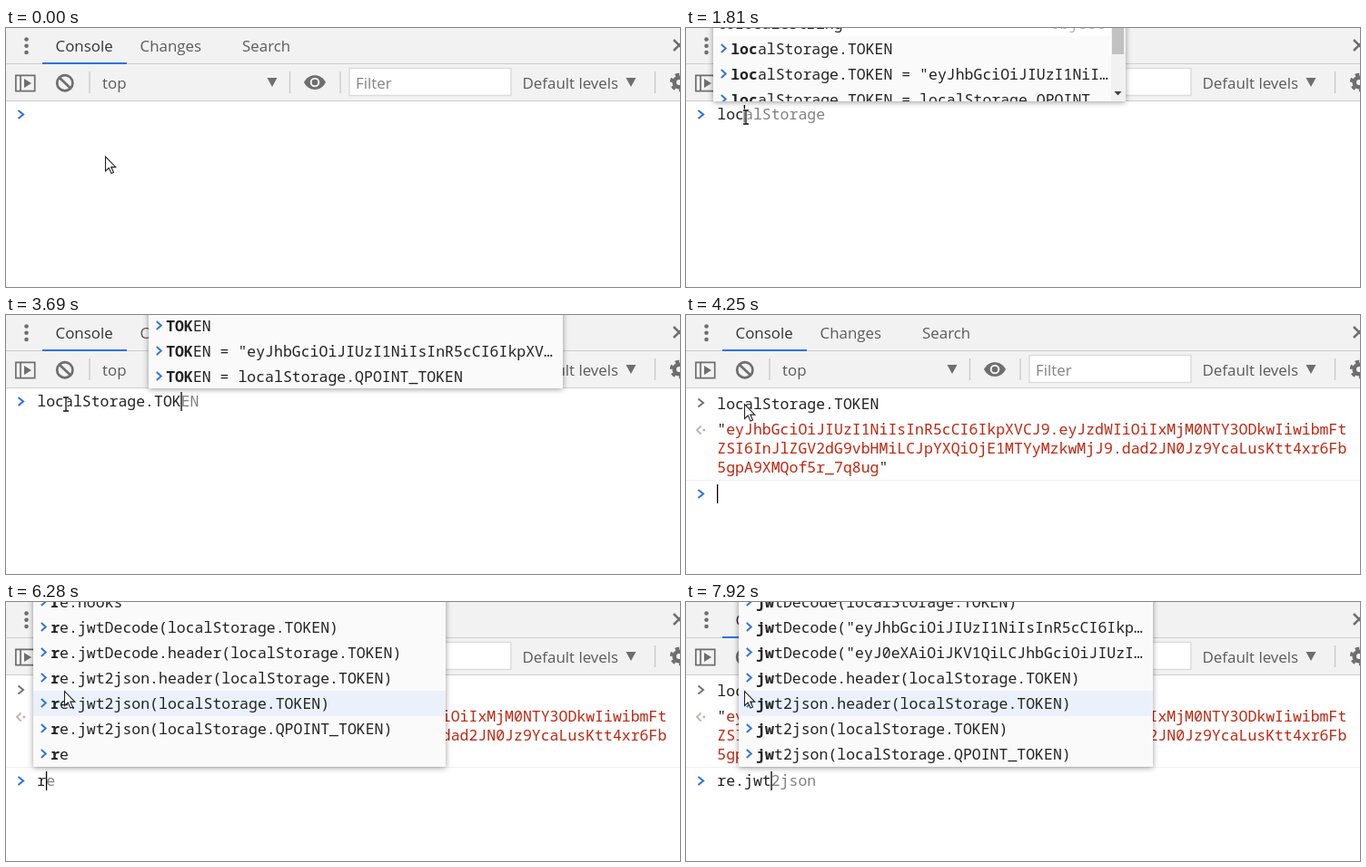
An HTML page for the animation above (7.99 s loop, 742 px wide and 286 px high).

```html
<!DOCTYPE html>
<html lang="en">
<head>
<meta charset="utf-8">
<title>Console session</title>
<style>
html, body { margin: 0; width: 100%; height: 100%; overflow: hidden; background: #fff; }
svg { display: block; }
text { white-space: pre; }
.ui { font: 16.9px "Open Sans", "Noto Sans", sans-serif; fill: #5a5a5a; }
.code { font: 16.5px "Noto Sans Mono", "DejaVu Sans Mono", monospace; fill: #222; }
.code .b { font-weight: 700; }
.code .hint { fill: #808080; }
.code.type { fill: #b4b4b4; }
.code.str { fill: #c0260f; }
.icon { fill: #6e6e6e; }
.line { fill: none; stroke: #6e6e6e; }
.shadow { filter: drop-shadow(0 1px 3px rgba(0, 0, 0, .4)); }
</style>
</head>
<body>
<svg width="742" height="286" viewBox="0 0 742 286">
  <rect width="742" height="80" fill="#f2f2f2"/>
  <path d="M0 39.5H742M0 80.5H742" stroke="#cdcdcd"/>
  <rect x="40" y="38" width="93" height="2" fill="#2a74e6"/>
  <g class="icon">
    <circle cx="22.5" cy="12.5" r="2.3"/><circle cx="22.5" cy="19.8" r="2.3"/><circle cx="22.5" cy="27" r="2.3"/>
    <path d="M20 56V66L28 61ZM287.500 55H298.500L293 65ZM682.500 55H693.500L688 65Z"/>
    <path d="M328 60C333 49.500 347 49.500 352 60C347 70.500 333 70.500 328 60Z"/>
    <circle cx="340" cy="60" r="5.300" fill="#f2f2f2"/><circle cx="340" cy="60" r="3.300"/>
  </g>
  <g class="line">
    <path d="M10.800 52.300H31.700V69.700H10.800ZM16 52V70" stroke-width="1.700"/>
    <circle cx="64.800" cy="60.700" r="8.600" stroke-width="2.700"/>
    <path d="M59 55L71 66.500" stroke-width="2.700"/>
    <path d="M735 13L747 25M735 25L747 13" stroke-width="2.500"/>
    <circle cx="741" cy="60" r="5.300" stroke-width="4.600"/>
    <circle cx="741" cy="60" r="8.700" stroke-width="3" stroke-dasharray="4.555"/>
  </g>
  <path d="M92 48V72M312.500 48V72M368 48V72M714.500 48V72" stroke="#c8c8c8" stroke-width="1.300"/>
  <rect x="378" y="44.500" width="178" height="30" fill="#fff" stroke="#dcdcdc" stroke-width="1.500"/>
  <g class="ui">
    <text x="54.500" y="26" style="fill:#333">Console</text>
    <text x="147.500" y="26">Changes</text>
    <text x="260" y="26">Search</text>
    <text x="106" y="67">top</text>
    <text x="385" y="67" style="fill:#828282">Filter</text>
    <text x="568.500" y="67">Default levels</text>
  </g>
  <g id="log">
    <path d="M0 182.500H742" stroke="#f0f0f0"/>
    <path d="M13.500 92.500L19 97L13.500 101.500" fill="none" stroke="#6e6e6e" stroke-width="1.900"/>
    <path d="M16.500 122.500L12 127L16.500 131.500" fill="none" stroke="#c7b0b0" stroke-width="1.900"/>
    <circle cx="19.800" cy="127" r="1.500" fill="#c7b0b0"/>
    <text class="code" x="34.300" y="104">localStorage.TOKEN</text>
    <text class="code str" x="34.300" y="132"><tspan fill="#222">"</tspan>eyJhbGciOiJIUzI1NiIsInR5cCI6IkpXVCJ9.eyJzdWIiOiIxMjM0NTY3ODkwIiwibmFt</text>
    <text class="code str" x="34.300" y="153">ZSI6InJlZGV2dG9vbHMiLCJpYXQiOjE1MTYyMzkwMjJ9.dad2JN0Jz9YcaLusKtt4xr6Fb</text>
    <text class="code str" x="34.300" y="174">5gpA9XMQof5r_7q8ug<tspan fill="#222">"</tspan></text>
  </g>
  <g id="prompt">
    <path id="mark" d="M13.500 91L19 95.500L13.500 100" fill="none" stroke-width="2.100"/>
    <text class="code" x="34.300" y="101"><tspan id="typed"></tspan><tspan id="hint" class="hint"></tspan></text>
    <rect id="caret" y="85" width="1.300" height="21" fill="#000"/>
  </g>
  <g id="popup"></g>
  <path id="arrow" d="M0 0V16L3.800 12.500L6.500 18.600L9 17.500L6.300 11.600H11.300Z" fill="#fff" stroke="#222" stroke-width="1.100"/>
  <g id="beam" fill="none">
    <path d="M-3 -7.500H3M0 -7.500V7.500M-3 7.500H3" stroke="#fff" stroke-width="3"/>
    <path d="M-3 -7.500H3M0 -7.500V7.500M-3 7.500H3" stroke="#111" stroke-width="1.300"/>
  </g>
</svg>
<script>
const LOOP = 7990, CELL = 9.9, ROW = 28;
const BLUE = '#2f73dc', PALE = '#a3a6d8', SKY = '#6fbcf7';
const $ = id => document.getElementById(id);

// Rows starting with ">" come from the history; "|" splits off a type label.
const menus = {
  local: { x: 30, right: 484, bottom: 81, first: -5, thumb: 29, bar: true, rows: [
    'toLocaleString|Object', '>localStorage.TOKEN',
    '>localStorage.TOKEN = "eyJhbGciOiJIUzI1NiI…',
    '>localStorage.TOKEN = localStorage.QPOINT'] },
  store: { x: 157, right: 613, bottom: 81, first: 12, rows: [
    '>TOKEN = "eyJhbGciOiJIUzI1NiIsInR5cCI6IkpXV…',
    '>TOKEN = localStorage.QPOINT_TOKEN', '>QPOINT_TOKEN'] },
  token: { x: 157, right: 613, bottom: 81, first: 12, rows: [
    '>TOKEN', '>TOKEN = "eyJhbGciOiJIUzI1NiIsInR5cCI6IkpXV…',
    '>TOKEN = localStorage.QPOINT_TOKEN'] },
  re: { x: 30, right: 484, bottom: 182, first: 0, hot: 4, rows: [
    '>re.hooks', '>re.jwtDecode(localStorage.TOKEN)',
    '>re.jwtDecode.header(localStorage.TOKEN)',
    '>re.jwt2json.header(localStorage.TOKEN)',
    '>re.jwt2json(localStorage.TOKEN)',
    '>re.jwt2json(localStorage.QPOINT_TOKEN)', '>re'] },
  dot: { x: 58, right: 514, bottom: 182, first: 0, hot: 4, bar: true, rows: [
    'valueOf', '__defineGetter__', '__defineSetter__', '__lookupGetter__',
    '__lookupSetter__', '__proto__', '>jwtDecode(localStorage.TOKEN)'] },
  jwt: { x: 58, right: 514, bottom: 182, first: 0, hot: 4, rows: [
    '>jwtDecode(localStorage.TOKEN)',
    '>jwtDecode("eyJhbGciOiJIUzI1NiIsInR5cCI6Ikp…',
    '>jwtDecode("eyJ0eXAiOiJKV1QiLCJhbGciOiJIUzI…',
    '>jwtDecode.header(localStorage.TOKEN)', '>jwt2json.header(localStorage.TOKEN)',
    '>jwt2json(localStorage.TOKEN)', '>jwt2json(localStorage.QPOINT_TOKEN)'] }
};

// start, typed text, hint, caret shown, menu, bold letters, prompt colour
const steps = [
  [0, '', '', 0],
  [630, '', '', 1],
  [1190, '', '', 0],
  [1510, 'l', 'ocalStorage', 1, 'local', 1],
  [1660, 'lo', 'calStorage', 1, 'local', 2],
  [1810, 'loc', 'alStorage', 1, 'local', 3],
  [2270, 'localStorage', '', 1],
  [2820, 'localStorage', '', 0],
  [2900, 'localStorage.', '', 1, '', 0, PALE],
  [2970, 'localStorage.', '', 1, 'store', 0, PALE],
  [3370, 'localStorage.T', 'OKEN', 1, 'token', 1],
  [3520, 'localStorage.TO', 'KEN', 1, 'token', 2],
  [3690, 'localStorage.TOK', 'EN', 1, 'token', 3],
  [3770, 'localStorage.TOKE', 'N', 1, 'token', 4],
  [4250, '', '', 1],
  [4800, '', '', 0],
  [5350, '', '', 1],
  [5900, '', '', 0],
  [6280, 'r', 'e', 1, 're', 1],
  [6360, 're', '', 1, 're', 2],
  [6660, 're.', 'hooks', 1, 'dot', 0, SKY],
  [7210, 're.', 'hooks', 0, 'dot', 0, SKY],
  [7440, 're.j', 'wt2json', 1, 'jwt', 1],
  [7670, 're.jw', 't2json', 1, 'jwt', 2],
  [7920, 're.jwt', '2json', 1, 'jwt', 2]
];

const box = (x, y, w, h, fill, extra = '') =>
  `<rect x="${x}" y="${y}" width="${w}" height="${h}" fill="${fill}" ${extra}/>`;

function rowSvg(menu, row, i, bold) {
  const past = row[0] === '>';
  const [name, type] = row.slice(past ? 1 : 0).split('|');
  const n = past ? bold : 0;
  const y = menu.first + i * ROW;
  const x = menu.x + (past ? 19.2 : 4);
  const fill = i === menu.hot ? '#ebf1fb' : past ? '#fafafa' : '#fff';
  let out = box(menu.x, y - 14, menu.right - menu.x, ROW + 1, fill);
  if (past) out += `<path d="M${menu.x + 8.8} ${y - 5}l5 4.500l-5 4.500" fill="none" stroke="${BLUE}" stroke-width="1.900"/>`;
  out += `<text class="code" x="${x}" y="${y + 6}"><tspan class="b">${name.slice(0, n)}</tspan>${name.slice(n)}</text>`;
  if (type) out += `<text class="code type" x="${menu.right - 23}" y="${y + 6}" text-anchor="end">${type}</text>`;
  return out;
}

function menuSvg(menu, bold) {
  const { x, right, bottom, bar, thumb } = menu;
  const w = right - x;
  let out = `<clipPath id="clip">${box(x, 0, w, bottom, '#000')}</clipPath>` +
    box(x, -20, w, bottom + 20, '#fafafa', 'class="shadow"') +
    '<g clip-path="url(#clip)">';
  menu.rows.forEach((row, i) => out += rowSvg(menu, row, i, bold));
  if (bar) {
    out += box(right - 16, 0, 16, bottom, '#f1f1f1');
    if (thumb) out += box(right - 15, 0, 13, thumb, '#c1c1c1');
    out += `<path d="M${right - 12.5} ${bottom - 11}h8l-4 4.500z" fill="#404040"/>`;
  }
  return out + '</g>';
}

function drawMouse(t) {
  const moves = t < 70 ? 0 : Math.min(9, Math.floor((t - 70) / 80) + 1);
  const p = moves / 9, e = p * p * (3 - 2 * p);
  const x = 109.500 - 43.500 * e, y = 142 - 43.500 * e;
  const beam = y < 107 && t < 4250;
  $('beam').style.display = beam ? '' : 'none';
  $('arrow').style.display = beam ? 'none' : '';
  $('beam').setAttribute('transform', `translate(${x} ${y})`);
  $('arrow').setAttribute('transform', `translate(${t < 4250 ? x : 64.5} ${y})`);
}

let shown = null;
function render(t) {
  drawMouse(t);
  const step = steps.filter(s => s[0] <= t).pop();
  if (step === shown) return;
  shown = step;
  const [, typed, hint, caret, menu, bold = 0, colour = BLUE] = step;
  const done = t >= 4250;
  $('log').style.display = done ? '' : 'none';
  $('prompt').setAttribute('transform', `translate(0 ${done ? 102 : 0})`);
  $('mark').setAttribute('stroke', colour);
  $('typed').textContent = typed;
  $('hint').textContent = hint;
  $('caret').setAttribute('x', 34 + typed.length * CELL);
  $('caret').style.display = caret ? '' : 'none';
  $('popup').innerHTML = menu ? menuSvg(menus[menu], bold) : '';
}

const start = performance.now();
function tick() {
  render((performance.now() - start) % LOOP);
  requestAnimationFrame(tick);
}
tick();
</script>
</body>
</html>
```
